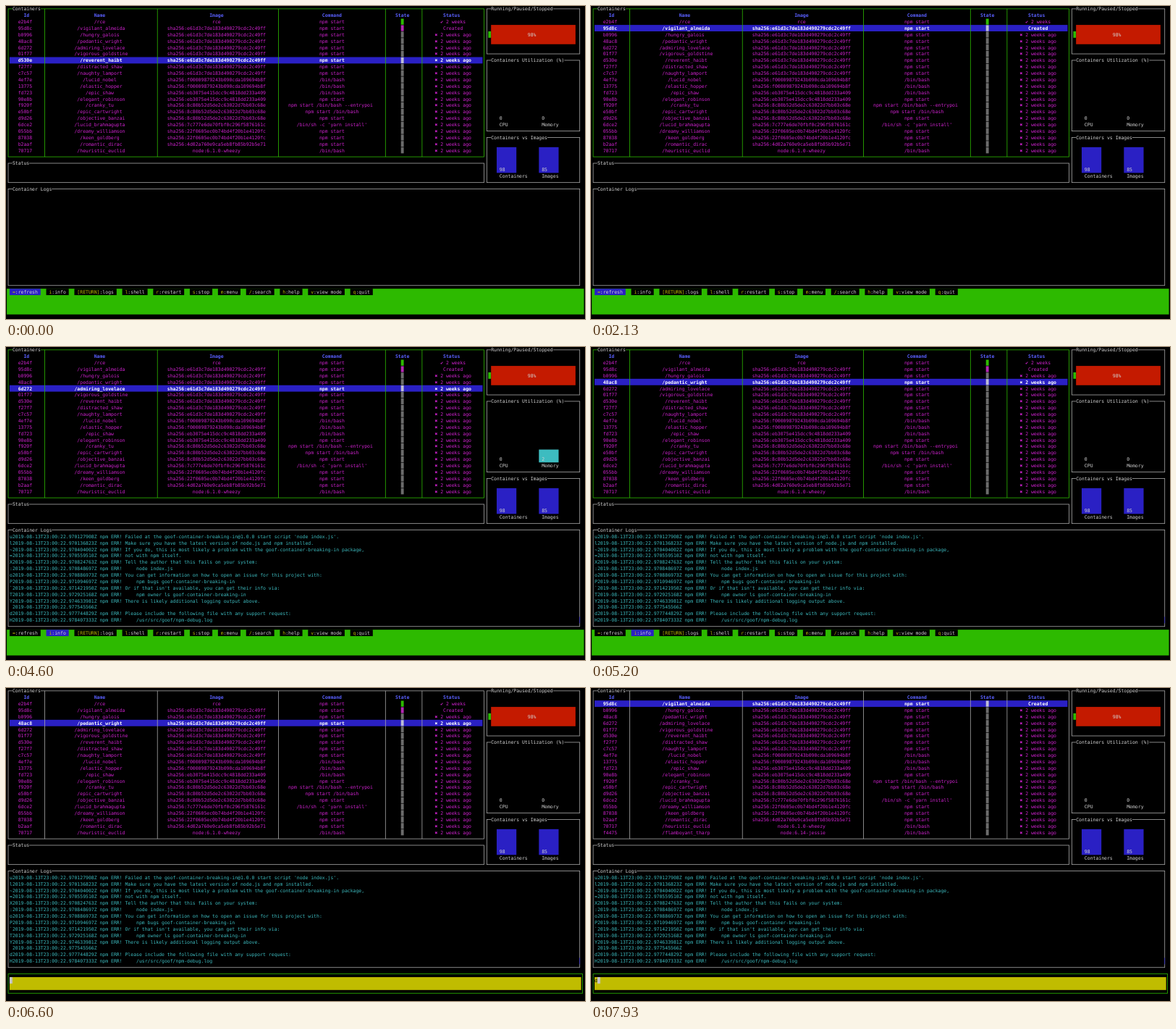
Write an HTML page with a canvas that moves like this. It is 800 px wide and 432 px high and loops after 8 s.

```html
<!DOCTYPE html>
<html lang="en">
<head>
<meta charset="utf-8">
<title>Container dashboard</title>
<style>
html, body { margin: 0; height: 100%; overflow: hidden; background: #000; }
canvas { display: block; }
</style>
</head>
<body>
<canvas id="screen" width="800" height="432"></canvas>
<script>
const ctx = document.getElementById('screen').getContext('2d');
const LOOP = 8000, CELL_W = 3.89, CELL_H = 8.88;
const WHITE = '#d4d4d4', LINE = '#a8a8a8', GREEN = '#2dba00', BLUE = '#2a20c4', RED = '#c41a00',
  YELLOW = '#c0bc00', CYAN = '#3dbcc0', MAGENTA = '#cf22cf', HEAD = '#5a60ff', GRAY = '#6c6c6c';

const colX = c => 1.1 + c * CELL_W;
const rowY = r => r * CELL_H - 0.54;

// Drawing on the character grid
function fill(c, r, w, h, color) {
  ctx.fillStyle = color;
  ctx.fillRect(colX(c), rowY(r), w * CELL_W, h * CELL_H);
}

function text(c, r, str, color = WHITE, bold = false) {
  ctx.font = `${bold ? 'bold ' : ''}6.46px "DejaVu Sans Mono", monospace`;
  ctx.fillStyle = color;
  [...str].forEach((ch, i) => {
    if (ch !== ' ') ctx.fillText(ch, colX(c + i), rowY(r) + 6.8);
  });
}

function vline(c, r1, r2, color) {
  ctx.fillStyle = color;
  ctx.fillRect(colX(c + 0.5) - 0.4, rowY(r1 + 0.5), 0.8, (r2 - r1) * CELL_H);
}

function box(c1, r1, c2, r2, title, color = LINE) {
  ctx.strokeStyle = color;
  ctx.lineWidth = 0.8;
  ctx.strokeRect(colX(c1 + 0.5), rowY(r1 + 0.5), (c2 - c1) * CELL_W, (r2 - r1) * CELL_H);
  if (title) {
    fill(c1 + 2, r1, title.length, 1, '#000');
    text(c1 + 2, r1, title);
  }
}

// Data
const HEADERS = ['Id', 'Name', 'Image', 'Command', 'State', 'Status'];
const AGO = '✖ 2 weeks ago', NPM = 'npm start', BASH = '/bin/bash';
const sha = {
  a: 'e61d3c7de183d490279cdc2c49ff', b: 'f00009879243b090cda109694b8f',
  c: 'eb3075e415dcc9c4818dd233a409', d: '8c80b52d5de2c63022d7bb03c68e',
  e: '7c777e6de70fbf0c296f5876161c', f: '22f0605ec0b74bd4f20b1e4120fc',
  g: '4d02a760e9ca5eb8fb85b92b5e71'
};
const item = (id, name, image, command = NPM, status = AGO, state = GRAY) =>
  ({ cells: [id, '/' + name, sha[image] ? 'sha256:' + sha[image] : image, command, '', status], state });

const all = [
  item('e2b4f', 'rce', 'rce', NPM, '✔ 2 weeks', GREEN),
  item('95d8c', 'vigilant_almeida', 'a', NPM, 'Created', '#b428b4'),
  item('b0996', 'hungry_galois', 'a'),
  item('48ac8', 'pedantic_wright', 'a'),
  item('6d272', 'admiring_lovelace', 'a'),
  item('01f77', 'vigorous_goldstine', 'a'),
  item('d530e', 'reverent_haibt', 'a'),
  item('f27f7', 'distracted_shaw', 'a'),
  item('c7c57', 'naughty_lamport', 'a'),
  item('4ef7e', 'lucid_nobel', 'b', BASH),
  item('13775', 'elastic_hopper', 'b', BASH),
  item('fd723', 'epic_shaw', 'c', BASH),
  item('90e8b', 'elegant_robinson', 'c'),
  item('f920f', 'cranky_tu', 'd', 'npm start /bin/bash --entrypoi'),
  item('e50bf', 'epic_cartwright', 'd', 'npm start /bin/bash'),
  item('d9d26', 'objective_banzai', 'd'),
  item('6dce2', 'lucid_brahmagupta', 'e', "/bin/sh -c 'yarn install'"),
  item('055bb', 'dreamy_williamson', 'f'),
  item('87038', 'keen_goldberg', 'f'),
  item('b2aaf', 'romantic_dirac', 'g'),
  item('70717', 'heuristic_euclid', 'node:6.1.0-wheezy', BASH),
  item('f4475', 'flamboyant_tharp', 'node:6.14-jessie', BASH)
];
const SIX = '✖ 6 weeks ago';
const docker = [
  item('b0085', 'xenodochial_ardinghelli', 'mongo', 'docker-entrypoint.sh mongod', '✖ 5 weeks ago'),
  item('aa445', 'pact_broker-docker_nginx_1', 'nginx:alpine', "nginx -g 'daemon off;'", SIX),
  item('590e2', 'pact_broker-docker_broker_app_1', 'dius/pact-broker', '/sbin/my_init', SIX),
  item('b00fb', 'pact_broker-docker_postgres_1', 'postgres', 'docker-entrypoint.sh postgres', SIX)
];
const WIDE = [0, 13, 53, 96, 134, 147, 169], NARROW = [0, 16, 59, 86, 126, 142, 169];
const tables = {
  all: { rows: all.slice(0, 21), edges: WIDE },
  d: { rows: all.slice(1), edges: WIDE },
  do: { rows: docker, edges: NARROW }
};

const logs = [
  'u70127908 Failed at the goof-container-breaking-in@1.0.0 start script \'node index.js\'.',
  'l70136823 Make sure you have the latest version of node.js and npm installed.',
  '~70404002 If you do, this is most likely a problem with the goof-container-breaking-in package,',
  '=70559510 not with npm itself.',
  'X70824763 Tell the author that this fails on your system:',
  ':70848697     node index.js',
  'o70886973 You can get information on how to open an issue for this project with:',
  'P71094697     npm bugs goof-container-breaking-in',
  '`71421950 Or if that isn\'t available, you can get their info via:',
  'T72925168     npm owner ls goof-container-breaking-in',
  'Y74633981 There is likely additional logging output above.',
  ' 77545566',
  'd77744829 Please include the following file with any support request:',
  'H78407333     /usr/src/goof/npm-debug.log'
].map(s => `${s[0]}2019-08-13T23:00:22.9${s.slice(1, 9)}Z${s[9] ? ' npm ERR!' + s.slice(9) : ''}`);

const menu = ['=:refresh', 'i:info', '[RETURN]:logs', 'l:shell', 'r:restart', 's:stop', 'm:menu',
  '/:search', 'h:help', 'v:view mode', 'q:quit'];

function infoLines({ cells: [shortId, name] }) {
  const id = shortId + '6efc02c722a4c601e44894f03f48a3a77dcbe39f0f9696dde088fc807f2';
  const dir = `   '/var/lib/docker/containers/${id}/`;
  const made = name === '/vigilant_almeida';
  const time = s => made ? '0001-01-01T00:00:00Z' : '2019-08-13T23:00:' + s;
  return [
    '{ Id:', `   '${id}',`, "  Created: '2019-08-13T23:00:22.04448939Z',", "  Path: 'npm',",
    "  Args: [ 'start' ],", '  State:', `   { Status: '${made ? 'created' : 'exited'}',`,
    ...['Running', 'Paused', 'Restarting', 'OOMKilled', 'Dead'].map(k => `     ${k}: false,`),
    '     Pid: 0,', `     ExitCode: ${made ? 0 : 1},`, "     Error: '',",
    `     StartedAt: '${time('22.451058367Z')}',`, `     FinishedAt: '${time('23.076860904Z')}' },`,
    '  Image:', `   'sha256:${sha.a}236d5bf058fd7f22cb9591d62194ff3b75c3',`,
    '  ResolvConfPath:', dir + "resolv.conf',", '  HostnamePath:', dir + "hostname',",
    '  HostsPath:', dir + "hosts',", '  LogPath:', dir + id + "-json.log',",
    `  Name: '${name}',`, '  RestartCount: 0,', "  Driver: 'overlay2',", "  Platform: 'linux',"
  ].flatMap(line => line.match(/.{1,140}/g));
}

// Panels
function drawTable({ rows, edges }, selected, border) {
  const row = (cells, r, color, bold) => cells.forEach((str, i) => {
    const space = edges[i + 1] - edges[i] - 1;
    text(edges[i] + 1 + Math.floor((space - str.length) / 2), r, str, color, bold);
  });
  const stateCol = edges[4] + 1 + Math.floor((edges[5] - edges[4] - 2) / 2);
  box(0, 0, 169, 23, '', border);
  fill(1, selected + 2, 168, 1, BLUE);
  edges.slice(1, -1).forEach(c => vline(c, 0, 23, border));
  fill(2, 0, 10, 1, '#000');
  text(2, 0, 'Containers');
  row(HEADERS, 1, HEAD, true);
  rows.forEach(({ cells, state }, i) => {
    const on = i === selected;
    row(cells, i + 2, on ? '#fff' : MAGENTA, on);
    fill(stateCol, i + 2.04, 1, 0.92, on ? '#bdbdd8' : state);
  });
}

function drawSidebar(memory) {
  box(170, 0, 203, 7, 'Running/Paused/Stopped');
  fill(171, 4, 1, 1, GREEN);
  fill(172, 3, 30, 3, RED);
  text(185, 4, '98%');
  box(170, 8, 203, 19, 'Containers Utilization (%)');
  if (memory) fill(189, 16, 7, 2, CYAN);
  text(175, 17, '0');
  text(190, 17, String(memory));
  text(175, 18, 'CPU');
  text(190, 18, 'Memory');
  box(170, 20, 203, 27, 'Containers vs Images');
  [[174, '98', 'Containers'], [189, '85', 'Images']].forEach(([c, count, label]) => {
    fill(c, 22, 7, 4, BLUE);
    text(c + 1, 25, count);
    text(c + 1, 26, label);
  });
}

function drawMenu(active) {
  fill(0, 44, 205, 4, GREEN);
  let c = 1;
  menu.forEach((label, i) => {
    const key = label.slice(0, label.indexOf(':', 1));
    fill(c, 44, label.length + 2, 1, i === active ? BLUE : '#000');
    text(c + 1, 44, key, YELLOW);
    text(c + 1 + key.length, 44, label.slice(key.length));
    c += label.length + 4;
  });
}

function drawSearch(query) {
  box(0, 44, 204, 47, '', GREEN);
  fill(1, 45, 203, 2, YELLOW);
  text(1, 45, query, '#000');
  fill(1 + query.length, 45, 1, 1, '#c4c4c4');
}

function drawInfo(container) {
  fill(31, 7, 143, 34, '#000');
  box(31, 7, 173, 40, 'Container Info', GREEN);
  infoLines(container).forEach((line, i) => text(32, 8 + i, line));
}

// Each step changes part of the state from its time on
const steps = [
  [0, { table: 'all', selected: 6, active: 0, memory: 0, info: false, logs: false, query: null }],
  [330, { selected: 5 }], [670, { selected: 4 }], [1000, { selected: 3 }],
  [1470, { selected: 2 }], [1800, { selected: 1 }],
  [2270, { info: true, active: 1 }], [3000, { info: false }],
  [3600, { selected: 2 }], [3800, { selected: 3 }], [4070, { logs: true }],
  [4330, { selected: 4 }], [4400, { memory: 2 }], [5000, { memory: 0 }], [5070, { selected: 3 }],
  [5530, { info: true }], [6330, { info: false }],
  [6600, { query: '' }], [6870, { query: 'd', table: 'd', selected: 0 }],
  [7070, { query: 'do', table: 'do' }], [7930, { query: 'd', table: 'd' }]
];

function draw(state) {
  const table = tables[state.table], searching = state.query !== null;
  ctx.fillStyle = '#000';
  ctx.fillRect(0, 0, 800, 432);
  drawTable(table, state.selected, state.info || searching ? LINE : GREEN);
  drawSidebar(state.memory);
  box(0, 24, 169, 27, 'Status');
  box(0, 28, 203, 43, 'Container Logs');
  if (state.logs) {
    logs.forEach((line, i) => text(1, 29 + i, line, CYAN));
    vline(203, 41.5, 42.5, BLUE);
  }
  if (searching) drawSearch(state.query); else drawMenu(state.active);
  if (state.info) drawInfo(table.rows[state.selected]);
}

ctx.textRendering = 'geometricPrecision';
let shown = 0;
function frame() {
  const t = performance.now() % LOOP;
  const past = steps.filter(([at]) => at <= t);
  if (past.length !== shown) {
    shown = past.length;
    draw(Object.assign({}, ...past.map(([, change]) => change)));
  }
  requestAnimationFrame(frame);
}
frame();
</script>
</body>
</html>
```
